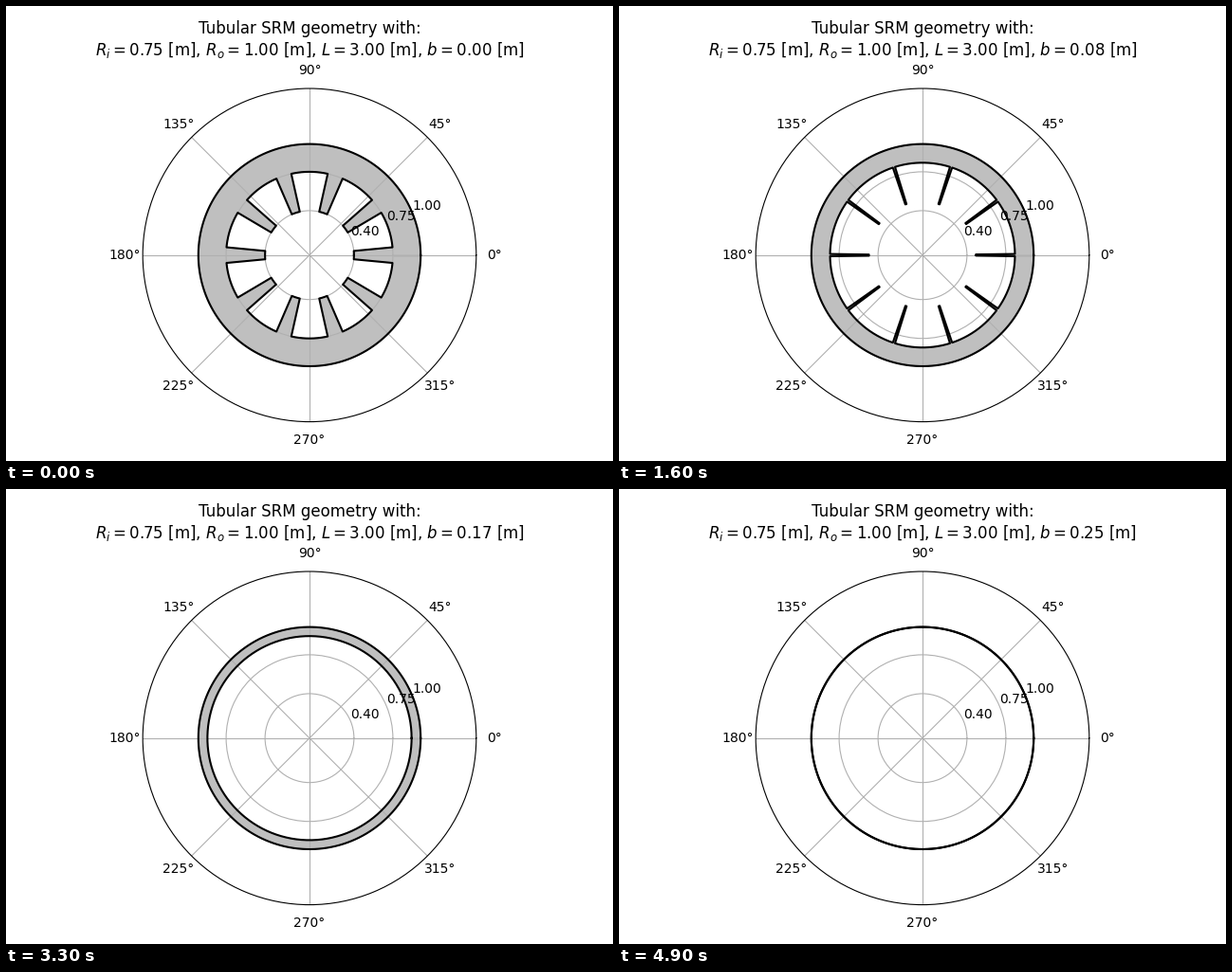
Animation, 640 px wide and 480 px high, one loop 5 s. Source, as a matplotlib script:

```python
import numpy as np
import matplotlib.pyplot as plt
from matplotlib.animation import FuncAnimation

R_IN, R_OUT, R_TIP, LENGTH = 0.75, 1.0, 0.4, 3.0
SPOKES = 10
HALF_ANGLE = 0.094
FRAMES, INTERVAL = 50, 100
PITCH = 2 * np.pi / SPOKES
CIRCLE = np.linspace(0, 2 * np.pi, 500)
BURN = np.linspace(0, R_OUT - R_IN, FRAMES)


def inner_profile(b):
    """Angles and radii of the burning surface after regressing by b."""
    half = HALF_ANGLE - b
    radius = R_IN + b
    if half <= 0:
        return CIRCLE, np.full_like(CIRCLE, radius)
    spans = [(0, half, R_TIP + b),
             (half, PITCH - half, radius),
             (PITCH - half, PITCH, R_TIP + b)]
    theta, r = [], []
    for k in range(SPOKES):
        for start, stop, level in spans:
            arc = k * PITCH + np.linspace(start, stop, 40)
            theta.append(arc)
            r.append(np.full_like(arc, level))
    return np.concatenate(theta), np.concatenate(r)


def title(b):
    return ("Tubular SRM geometry with:\n"
            f"$R_i = {R_IN:.2f}$ [m], $R_o = {R_OUT:.2f}$ [m], "
            f"$L = {LENGTH:.2f}$ [m], $b = {b:.2f}$ [m]")


fig = plt.figure(figsize=(6.4, 4.8), dpi=100)
ax = fig.add_axes([0, 41.4 / 480, 1, 351.6 / 480], projection="polar")

grain, = ax.fill(CIRCLE, np.full_like(CIRCLE, R_OUT),
                 color="gray", alpha=0.5, lw=0)
seam, = ax.plot([0, 0], [R_IN, R_OUT], color="gray", alpha=0.5, lw=1,
                zorder=1, solid_capstyle="butt")
ax.plot(CIRCLE, np.full_like(CIRCLE, R_OUT), color="black", lw=1.5)
surface, = ax.plot([], [], color="black", lw=1.5)
ax.set_ylim(0, 1.5)
ax.set_yticks([R_TIP, R_IN, R_OUT])
heading = ax.set_title(title(0))


def update(frame):
    b = BURN[frame]
    theta, r = inner_profile(b)
    surface.set_data(theta, r)
    outer = np.column_stack([CIRCLE[::-1], np.full_like(CIRCLE, R_OUT)])
    grain.set_xy(np.vstack([np.column_stack([theta, r]), outer]))
    seam.set_data([0, 0], [R_IN + b, R_OUT])
    heading.set_text(title(b))
    return grain, seam, surface, heading


anim = FuncAnimation(fig, update, frames=FRAMES, interval=INTERVAL,
                     repeat=True, repeat_delay=0, blit=False)
plt.show()
```
